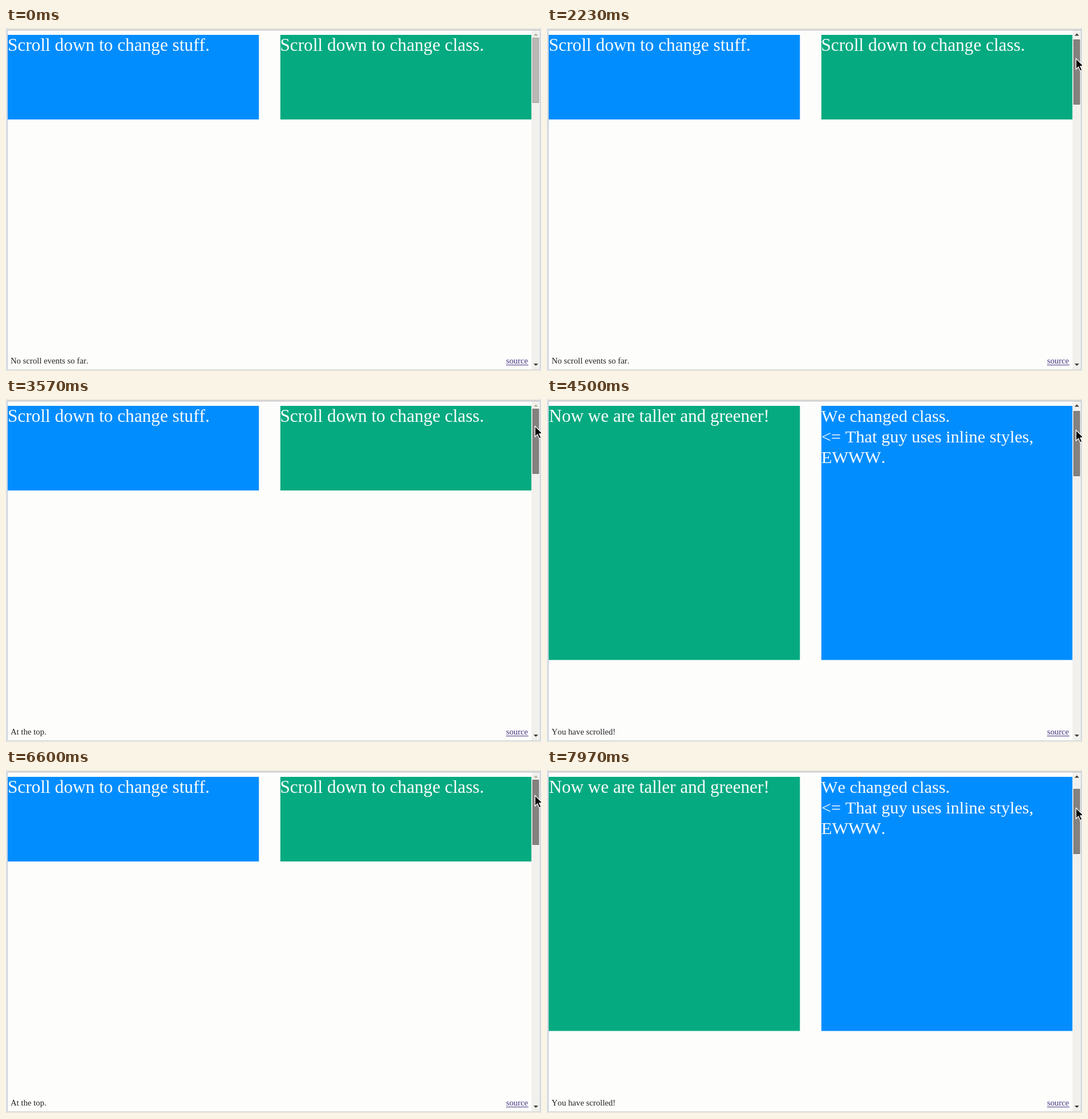
Animation, 934 px wide and 600 px high, one loop 8 s. Source, as an HTML page:

```html
<!DOCTYPE html>
<html lang="en">
<head>
<meta charset="utf-8">
<title>Scroll demo</title>
<style>
  html, body { margin: 0; width: 100%; height: 100%; overflow: hidden; background: #fdfdfc; }
  svg { display: block; width: 934px; height: 600px; }
  text { font-family: "Liberation Serif", "Times New Roman", serif; font-kerning: none; }
  .big { font-size: 31.2px; fill: #fbfdfd; }
  .class { font-size: 30.25px; }
  .small { font-size: 14.7px; fill: #222; }
  .blue { fill: #028dfe; }
  .green { fill: #05aa80; }
</style>
</head>
<body>
<svg viewBox="0 0 934 600">
  <rect width="934" height="600" fill="#fdfdfc"/>

  <g id="before">
    <rect class="blue" x="3" y="12" width="438.5" height="148"/>
    <rect class="green" x="479" y="12" width="438.5" height="148"/>
    <text class="big" x="3" y="40">Scroll down to change stuff.</text>
    <text class="big" x="478.5" y="40">Scroll down to change class.</text>
  </g>

  <g id="after">
    <rect class="green" x="3" y="12" width="438.5" height="444.5"/>
    <rect class="blue" x="479" y="12" width="438.5" height="444.5"/>
    <text class="big" x="3.5" y="40" style="font-size:31px">Now we are taller and greener!</text>
    <text class="big class" x="479" y="40">We changed class.</text>
    <text class="big class" x="479" y="76">&lt;= That guy uses inline styles,</text>
    <text class="big class" x="479" y="112">EWWW.</text>
  </g>

  <text class="small" id="status" x="8" y="587"></text>
  <text class="small" x="873" y="587" style="fill:#46337f">source</text>
  <path d="M873 589.5h39" stroke="#46337f"/>

  <rect x="917.5" y="4" width="15" height="593" fill="#f1f0ec"/>
  <path id="up" d="M921 13.5h8l-4-4z"/>
  <path d="M921 587h8l-4 4z" fill="#3c3a34"/>
  <rect id="thumb" x="919.5" width="10.5" height="113"/>

  <path d="M0 1.5H934M0 598.5H934" stroke="#e9e8e0" stroke-width="3"/>
  <path d="M0 3.5H934" stroke="#aaa9b4"/>
  <path d="M0 597.5H934" stroke="#d0d4d4"/>
  <path d="M1 0V600M933 0V600" stroke="#d6dfe9" stroke-width="2"/>
  <path d="M2.5 3V597M932.5 3V597" stroke="#c6cdda"/>

  <path id="cursor" d="M.5 .5V19L4.8 15 7.8 22 11 20.6 8 13.8H14z"
        fill="#0a0a0a" stroke="#fff" stroke-width="1.2"/>
</svg>
<script>
const LOOP = 8000, TOP = 17, GRIP = 33, PRESS = 2070, HOVER = 1600, DELAY = 150;
const $ = id => document.getElementById(id);

// key points of the pointer: time, y
const path = [
  [0, 340], [1670, 47], [PRESS, 48], [2930, 76], [3200, 76], [3420, 47], [4130, 47],
  [4500, 54], [5670, 106], [5900, 106], [6500, 44], [7530, 44], [LOOP, 67.5]
];

function pointerY(t) {
  const i = path.findIndex(k => k[0] > t);
  const [t0, y0] = path[i - 1], [t1, y1] = path[i];
  return Math.round(y0 + (y1 - y0) * (t - t0) / (t1 - t0));
}

const pointerX = t => 923 + 17 * Math.max(0, 1 - t / 500);
const thumbY = t => t < PRESS ? TOP : Math.max(TOP, pointerY(t) - GRIP);

function draw(t) {
  // the page reacts to the scrollbar with a short delay
  const scrolled = thumbY(Math.max(0, t - DELAY)) > TOP;
  const y = thumbY(t), active = t >= HOVER;

  $("cursor").setAttribute("transform", `translate(${pointerX(t)} ${pointerY(t)})`);
  $("thumb").setAttribute("y", y + .5);
  $("thumb").setAttribute("fill", active ? "#85817f" : "#b9b8b4");
  $("thumb").setAttribute("stroke", active ? "#77736f" : "#a19f9a");
  $("up").setAttribute("fill", y > TOP ? "#3c3a34" : "#b5b09a");
  $("before").style.display = scrolled ? "none" : "";
  $("after").style.display = scrolled ? "" : "none";
  $("status").textContent = scrolled ? "You have scrolled!"
    : t < PRESS + 1000 ? "No scroll events so far." : "At the top.";
}

const start = performance.now();
function tick() {
  draw((performance.now() - start) % LOOP);
  requestAnimationFrame(tick);
}
tick();
</script>
</body>
</html>
```
